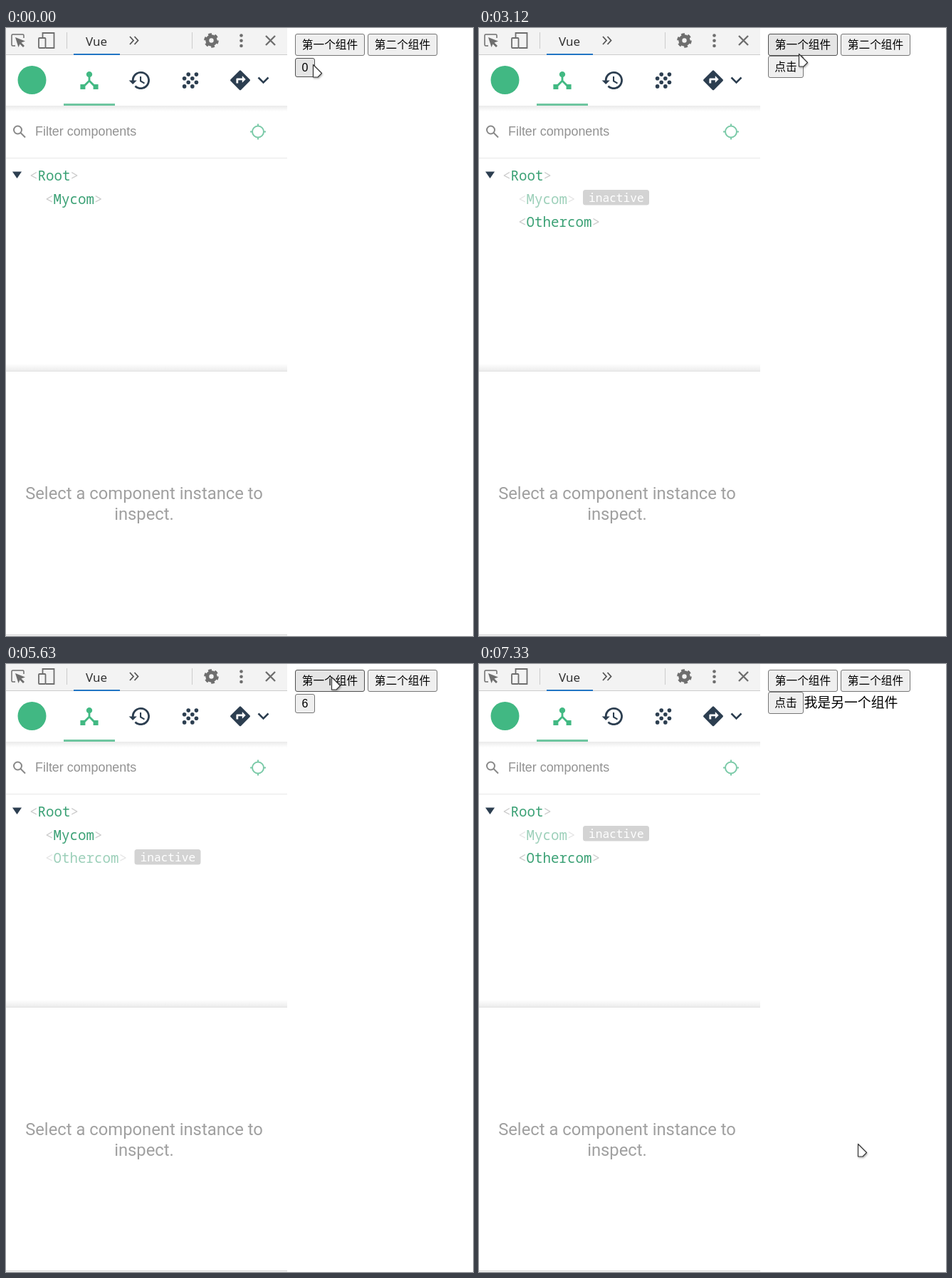
Write an HTML page that moves like this. It is 656 px wide and 853 px high and loops after 7.42 s.

```html
<!DOCTYPE html>
<html lang="zh">
<head>
<meta charset="utf-8">
<style>
  html, body { margin: 0; width: 100%; height: 100%; overflow: hidden; background: #fff; }
  svg { display: block; }
  .mono { font: 19.2px "Noto Sans Mono", monospace; fill: #ccc; white-space: pre; }
  .mono tspan { fill: #3ba175; }
  .badge text { font: 500 16.2px "Noto Sans Mono", monospace; fill: #fff; }
  .badge rect { fill: #d3d3d3; }
  .hint { font: 23.8px Roboto, sans-serif; fill: #a0a0a0; text-anchor: middle; }
  .line { fill: none; stroke: #6e6e6e; stroke-width: 1.8; }
  .button rect { fill: #efefef; stroke: #767676; }
  .button.hover rect { fill: #e5e5e5; stroke: #4f4f4f; }
  .button.pressed rect { fill: #f5f5f5; stroke: #8d8d8d; }
  .button text { font: 15.7px "Noto Sans CJK SC", "Noto Sans CJK", sans-serif; text-anchor: middle; }
  #count text { font: 16px "Liberation Sans", sans-serif; }
</style>
</head>
<body>
<svg width="656" height="853" viewBox="0 0 656 853">
  <defs>
    <linearGradient id="down" x2="0" y2="1"><stop stop-color="#eaeaea"/><stop offset="1" stop-color="#fff"/></linearGradient>
    <linearGradient id="up" x2="0" y2="1"><stop stop-color="#fff"/><stop offset="1" stop-color="#ececec"/></linearGradient>
    <filter id="shadow" x="-50%" y="-50%" width="200%" height="200%">
      <feDropShadow dx="1" dy="1.5" stdDeviation="1" flood-opacity=".3"/>
    </filter>
  </defs>

  <!-- Toolbar -->
  <rect width="395" height="38" fill="#f3f3f3"/>
  <path d="M0 37.5H395" stroke="#ccc"/>
  <path d="M85.5 6V29M261.5 6V29" stroke="#ccc"/>
  <g class="line">
    <path d="M25 14V10.5Q25 9 23.500 9H9.500Q8 9 8 10.500V23.500Q8 25 9.500 25H13" stroke-width="1.500"/>
    <path d="M51.500 13V7H67.500V28H56"/>
    <rect x="46" y="14" width="9.500" height="14" rx="1"/>
    <path d="M174 12L179 17.500L174 23M180.500 12L185.500 17.500L180.500 23" stroke="#555"/>
    <path d="M365 11L378 24M378 11L365 24" stroke-width="2.400"/>
    <circle cx="288.500" cy="17.500" r="5.700" stroke-width="5"/>
    <circle cx="288.500" cy="17.500" r="8.600" stroke-width="3.400" stroke-dasharray="4.700 4.306"/>
  </g>
  <g fill="#6e6e6e">
    <path d="M13 13L27 18.500L21.500 20.500L26 25L24 27L19.500 22.500L17.500 27Z"/>
    <circle cx="330.500" cy="10.500" r="2.300"/><circle cx="330.500" cy="17.800" r="2.300"/><circle cx="330.500" cy="25" r="2.300"/>
  </g>
  <text x="112" y="25" font-family="Noto Sans, sans-serif" font-size="17" fill="#333">Vue</text>
  <rect x="95" y="36" width="65" height="2" fill="#2275c4"/>

  <!-- Tabs -->
  <rect y="109" width="395" height="8" fill="url(#down)"/>
  <circle cx="36.500" cy="73" r="20" fill="#41b883"/>
  <rect x="81" y="106" width="72" height="3" fill="#6ec6a0"/>
  <path transform="translate(100.200 56.700) scale(1.400)" fill="#42b983" d="M17 16l-4-4V8.820C14.160 8.400 15 7.300 15 6c0-1.660-1.340-3-3-3S9 4.340 9 6c0 1.300.840 2.400 2 2.820V12l-4 4H3v5h5v-3.050l4-4.200 4 4.200V21h5v-5h-4z"/>
  <g fill="#2c3e50">
    <path transform="translate(171.200 56.700) scale(1.400)" d="M13 3a9 9 0 0 0-9 9H1l4 4 4-4H6a7 7 0 1 1 2.060 4.940l-1.420 1.420A9 9 0 1 0 13 3zm-1 5v5l4.280 2.540.720-1.210-3.500-2.080V8H12z"/>
    <g id="grain" transform="translate(242.200 56.700) scale(1.400)"></g>
    <path transform="translate(312.200 56.500) scale(1.400)" fill-rule="evenodd" d="M21.710 11.290l-9-9q-.7-.6-1.410 0l-9 9q-.6.7 0 1.410l9 9q.7.600 1.410 0l9-9q.6-.7 0-1.410zM14 14.500V12h-4v3H8v-4q0-1 1-1h5V7.500l3.500 3.500z"/>
    <path d="M9 201.500H22L15.500 211Z"/>
  </g>
  <path d="M354.500 69.500L361.500 76.500L368.500 69.500" fill="none" stroke="#2c3e50" stroke-width="2.500"/>

  <!-- Filter -->
  <g fill="none" stroke="#888" stroke-width="2">
    <circle cx="16.500" cy="143" r="5.500"/><path d="M20.500 147L27 153.500"/>
  </g>
  <text x="41" y="151" font-family="Liberation Sans, sans-serif" font-size="17.900" fill="#929292">Filter components</text>
  <g fill="none" stroke="#7bcaa8" stroke-width="2">
    <circle cx="354" cy="145.500" r="8"/>
    <path d="M354 134.500V138M354 153V156.500M343 145.500H346.500M361.500 145.500H365"/>
  </g>
  <path d="M0 182.500H395" stroke="#e8e8e8"/>

  <!-- Component tree -->
  <text class="mono" x="33" y="213.500">&lt;<tspan>Root</tspan>&gt;</text>
  <text class="mono" id="mycom" x="55" y="246.500">&lt;<tspan>Mycom</tspan>&gt;</text>
  <text class="mono" id="othercom" x="55" y="279">&lt;<tspan>Othercom</tspan>&gt;</text>
  <g class="badge" id="mycomBadge" transform="translate(146 227)">
    <rect width="93" height="21.500" rx="3.500"/><text x="8" y="16.500">inactive</text>
  </g>
  <g class="badge" id="othercomBadge" transform="translate(180.500 260)">
    <rect width="93" height="21.500" rx="3.500"/><text x="8" y="16.500">inactive</text>
  </g>

  <!-- Inspector -->
  <rect y="471" width="395" height="10" fill="url(#up)"/>
  <path d="M0 481.500H395" stroke="#e2e2e2"/>
  <text class="hint" x="194" y="661">Select a component instance to</text>
  <text class="hint" x="194" y="690">inspect.</text>
  <path d="M0 851.500H395" stroke="#ccc"/>

  <!-- Page -->
  <g id="buttons"></g>
  <text id="message" x="456.500" y="60.500" font-family="Noto Sans CJK SC, Noto Sans CJK, sans-serif" font-size="18.850">我是另一个组件</text>
  <path id="cursor" d="M.5 .5V18H7L12.500 12.500Z" fill="#fff" stroke="#333" stroke-width="1.200" stroke-linejoin="round" filter="url(#shadow)"/>
</svg>
<script>
const LOOP = 7420;
const byId = id => document.getElementById(id);
const show = (id, on) => byId(id).setAttribute('display', on ? 'inline' : 'none');

byId('grain').innerHTML = [[10, 6], [18, 6], [6, 10], [14, 10], [10, 14], [18, 14], [6, 18], [14, 18]]
  .map(([x, y]) => `<circle cx="${x}" cy="${y}" r="2"/>`).join('');

const buttons = [
  { id: 'first', x: 406, y: 8, w: 97, h: 30, label: '第一个组件' },
  { id: 'second', x: 508, y: 8, w: 97, h: 30, label: '第二个组件' },
  { id: 'count', x: 406, y: 42, w: 27, h: 26, label: '0' },
  { id: 'click', x: 406, y: 39, w: 49, h: 30, label: '点击' }
];
byId('buttons').innerHTML = buttons.map(({ id, x, y, w, h, label }) =>
  `<g id="${id}" class="button"><rect x="${x + .5}" y="${y + .5}" width="${w}" height="${h}" rx="2.5"/>
   <text x="${x + .5 + w / 2}" y="${y + h / 2 + 6}">${label}</text></g>`).join('');

// Mouse down and up times; the first six go to the counter.
const presses = [[160, 235], [310, 460], [780, 860], [1100, 1180], [1410, 1490], [1730, 1790],
  [2420, 2570], [3670, 3820], [4610, 4780], [6550, 6630]];

// Cursor moves: first step, last step, number of steps, destination.
const moves = [
  [780, 780, 1, 430, 51],
  [1960, 2420, 7, 541, 21],
  [2890, 3120, 4, 449, 36],
  [3200, 3270, 2, 436, 47],
  [3440, 3440, 1, 430, 53],
  [4050, 4220, 3, 451, 34],
  [4300, 4380, 2, 459, 20],
  [5630, 5630, 1, 457, 18],
  [5710, 5940, 4, 294, 237],
  [6020, 6330, 5, 499, 40],
  [6400, 6480, 2, 539, 22],
  [6810, 7330, 8, 532, 673]
];

function cursorAt(t) {
  let x = 431, y = 51;
  for (const [start, end, steps, toX, toY] of moves) {
    if (t < start) break;
    const interval = (end - start) / (steps - 1) || 1;
    const part = Math.min(steps, Math.floor((t - start) / interval + 1.1)) / steps;
    x += (toX - x) * part;
    y += (toY - y) * part;
  }
  return [x, y];
}

function render(t) {
  const otherActive = t >= 2570 && t < 4780 || t >= 6630;
  const otherCreated = t >= 2570;
  const [x, y] = cursorAt(t);
  const pressed = presses.some(([down, up]) => t >= down && t < up);

  for (const b of buttons) {
    const over = x >= b.x && x <= b.x + b.w && y >= b.y && y <= b.y + b.h;
    byId(b.id).setAttribute('class', 'button' + (over ? pressed ? ' pressed' : ' hover' : ''));
  }
  byId('count').lastChild.textContent = presses.slice(0, 6).filter(([, up]) => t >= up).length;
  show('count', !otherActive);
  show('click', otherActive);
  show('message', otherActive && t >= 3820);

  show('othercom', otherCreated);
  show('mycomBadge', otherActive);
  show('othercomBadge', otherCreated && !otherActive);
  byId('mycom').setAttribute('opacity', otherActive ? .5 : 1);
  byId('othercom').setAttribute('opacity', otherActive ? 1 : .5);
  byId('cursor').setAttribute('transform', `translate(${Math.round(x)} ${Math.round(y)})`);
}

const origin = performance.now();
function tick() {
  render((performance.now() - origin) % LOOP);
  requestAnimationFrame(tick);
}
tick();
</script>
</body>
</html>
```
